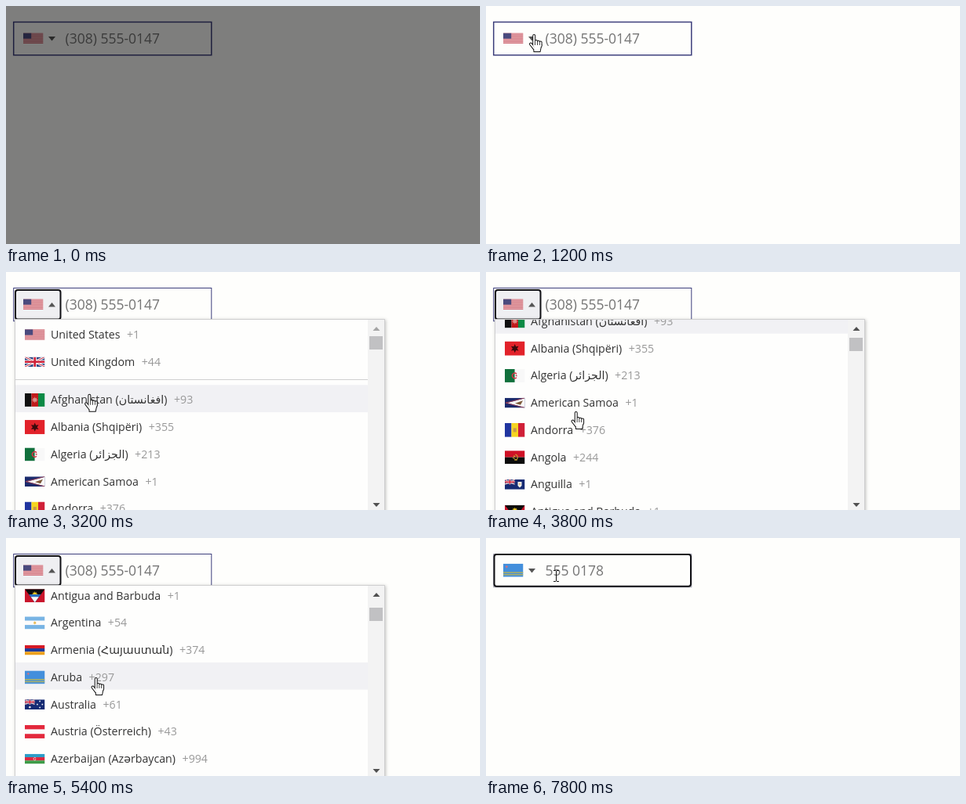
Animation of 604x304 px, one loop 8000 ms. Source, as an HTML page with a canvas:

```html
<!DOCTYPE html>
<html lang="en">
<head>
<meta charset="utf-8">
<title>Phone input with country list</title>
<style>
html, body { margin: 0; width: 100%; height: 100%; overflow: hidden; background: #fefefc; }
canvas { display: block; }
</style>
</head>
<body>
<canvas id="stage" width="604" height="304"></canvas>
<script>
const ctx = document.getElementById('stage').getContext('2d');
const LOOP = 8000, STEP = 200;
const OPEN = 1600, PICK = 6000;
const ROW = 34.75, LIST_TOP = 61, GROUP_TOP = 144.4;
const LIST_FONT = '14.2px "Open Sans", "DejaVu Sans", sans-serif';
const FIELD_FONT = '17.5px "Open Sans", sans-serif';

// ---- shapes ----
function rect(color, x, y, w, h) {
  ctx.fillStyle = color;
  ctx.fillRect(x, y, w, h);
}
function trace(pts) {
  ctx.beginPath();
  for (let i = 0; i < pts.length; i += 2) ctx.lineTo(pts[i], pts[i + 1]);
}
function poly(color, ...pts) {
  trace(pts);
  ctx.fillStyle = color;
  ctx.fill();
}
function line(color, width, ...pts) {
  trace(pts);
  ctx.strokeStyle = color;
  ctx.lineWidth = width;
  ctx.stroke();
}
function star(color, x, y, r, points = 5) {
  const pts = [];
  for (let i = 0; i < points * 2; i++) {
    const a = i * Math.PI / points - Math.PI / 2, d = i % 2 ? r / 2 : r;
    pts.push(x + d * Math.cos(a), y + d * Math.sin(a));
  }
  poly(color, ...pts);
}
function arc(color, width, x, y, r, from, to) {
  ctx.beginPath();
  ctx.arc(x, y, r, from, to);
  ctx.strokeStyle = color;
  ctx.lineWidth = width;
  ctx.stroke();
}
function crescent(color, x, y, r) {
  arc(color, r * 0.45, x, y, r, 0.8, 5.5);
  star(color, x + r * 0.6, y, r * 0.45);
}
function focusBox(x, y, w, h, fill) {
  ctx.beginPath();
  ctx.roundRect(x, y, w, h, 3);
  ctx.fillStyle = fill;
  ctx.fill();
  ctx.strokeStyle = '#101014';
  ctx.lineWidth = 2;
  ctx.stroke();
}
function caret(color, x, y, size) {
  poly(color, x - 4.5, y - size / 2, x + 4.5, y - size / 2, x, y + size / 2);
}
function text(str, x, y, color, font = LIST_FONT) {
  ctx.font = font;
  ctx.fillStyle = color;
  ctx.fillText(str, x, y);
  return x + ctx.measureText(str).width;
}

// ---- flags: [height / width, painter], drawn from the top left corner ----
const FW = 25.5, MID = FW / 2;

function rows(h, ...colors) {
  const s = h / colors.length;
  colors.forEach((c, i) => rect(c, 0, i * s, FW, s));
}
function cols(h, ...colors) {
  const s = FW / colors.length;
  colors.forEach((c, i) => rect(c, i * s, 0, s, h));
}
function jack(w, h) {
  const k = w / FW;
  ctx.save();
  ctx.beginPath();
  ctx.rect(0, 0, w, h);
  ctx.clip();
  rect('#27407f', 0, 0, w, h);
  for (const [color, width] of [['#f4f4f6', 3], ['#cf3045', 1]]) {
    line(color, width * k, 0, 0, w, h);
    line(color, width * k, w, 0, 0, h);
  }
  for (const [color, width] of [['#f4f4f6', 4.6], ['#cf2038', 2.7]]) {
    line(color, width * k, w / 2, 0, w / 2, h);
    line(color, width * k, 0, h / 2, w, h / 2);
  }
  ctx.restore();
}
function ensign(h) {
  rect('#152a73', 0, 0, FW, h);
  jack(MID, h / 2);
}

const flags = {
  us: [0.53, h => {
    rect('#e8b6bb', 0, 0, FW, h);
    for (let i = 0; i < 13; i += 2) rect('#d06c77', 0, i * h / 13, FW, h / 13);
    rect('#4a4a7e', 0, 0, FW * 0.4, h * 7 / 13);
  }],
  gb: [1 / 2, h => jack(FW, h)],
  af: [2 / 3, h => {
    cols(h, '#101010', '#c01a1a', '#0b8a45');
    star('#dd8f8a', MID, h / 2, 4.2, 8);
  }],
  al: [5 / 7, h => {
    rect('#e2222a', 0, 0, FW, h);
    star('#3a0a0c', MID, h / 2, 5.6, 6);
  }],
  dz: [2 / 3, h => {
    cols(h, '#11703c', '#f8f8f8');
    crescent('#d43545', MID, h / 2, 3.2);
  }],
  as: [1 / 2, h => {
    rect('#1a2a6c', 0, 0, FW, h);
    poly('#f8f8f8', FW, 0.5, 3, h / 2, FW, h - 0.5);
    line('#b04050', 0.8, FW, 0, 1, h / 2, FW, h);
    poly('#7d5a3a', 13, 7, 23, 3.5, 20, 9);
  }],
  ad: [0.7, h => {
    cols(h, '#2035a0', '#f6d520', '#d02038');
    rect('#c99a4a', MID - 2, h / 2 - 2.5, 4, 5);
  }],
  ao: [2 / 3, h => {
    rows(h, '#cf1126', '#0c0c0c');
    arc('#c9a030', 1.1, MID, h / 2, 3.6, -1.4, 1.7);
    line('#c9a030', 1.1, 10, 9, 15.5, 12.5);
    star('#c9a030', 12, 7.3, 1.6);
  }],
  ai: [1 / 2, h => {
    ensign(h);
    poly('#f0f0ea', 16.5, 3, 21.5, 3, 21.5, 8, 19, 10.5, 16.5, 8);
    star('#e0a050', 19, 5.8, 1.6, 3);
  }],
  ag: [2 / 3, h => {
    rect('#c9152b', 0, 0, FW, h);
    poly('#0c0c0c', 0, 0, FW, 0, MID, h);
    star('#f2cc22', MID, h * 0.4, 4, 9);
    poly('#2a6fc0', 5.1, h * 0.4, FW - 5.1, h * 0.4, MID, h);
    poly('#fafafa', 7.7, h * 0.6, FW - 7.7, h * 0.6, MID, h);
  }],
  ar: [0.63, h => {
    rows(h, '#78b4e4', '#fbfbfb', '#78b4e4');
    star('#e5ba55', MID, h / 2, 2.3, 8);
  }],
  am: [1 / 2, h => rows(h, '#d51a26', '#1c3c9c', '#eca01c')],
  aw: [2 / 3, h => {
    rect('#438fdc', 0, 0, FW, h);
    for (const y of [0.63, 0.79]) rect('#b5b35c', 0, h * y, FW, h / 12);
    star('#d8707c', 4.3, 4, 2, 4);
  }],
  au: [1 / 2, h => {
    ensign(h);
    star('#f4f4f8', FW / 4, h * 0.77, 1.8, 7);
    for (let a = 0; a < 4; a++)
      star('#f4f4f8', FW * 0.75 + 3.2 * Math.cos(a * Math.PI / 2), h / 2 + 4 * Math.sin(a * Math.PI / 2), 1.3, 7);
  }],
  at: [2 / 3, h => rows(h, '#e3283c', '#fbfbfb', '#e3283c')],
  az: [1 / 2, h => {
    rows(h, '#2c9dc8', '#dc2840', '#3e9c48');
    crescent('#f6e4e6', MID, h / 2, 1.7);
  }]
};
function drawFlag(key, x, midY) {
  const [ratio, paint] = flags[key], h = FW * ratio;
  ctx.save();
  ctx.translate(x, midY - h / 2);
  ctx.beginPath();
  ctx.rect(0, 0, FW, h);
  ctx.clip();
  paint(h);
  ctx.restore();
}

const countries = [
  ['us', 'United States', '+1'],
  ['gb', 'United Kingdom', '+44'],
  ['af', 'Afghanistan (افغانستان)', '+93'],
  ['al', 'Albania (Shqipëri)', '+355'],
  ['dz', 'Algeria (الجزائر)', '+213'],
  ['as', 'American Samoa', '+1'],
  ['ad', 'Andorra', '+376'],
  ['ao', 'Angola', '+244'],
  ['ai', 'Anguilla', '+1'],
  ['ag', 'Antigua and Barbuda', '+1'],
  ['ar', 'Argentina', '+54'],
  ['am', 'Armenia (Հայաստան)', '+374'],
  ['aw', 'Aruba', '+297'],
  ['au', 'Australia', '+61'],
  ['at', 'Austria (Österreich)', '+43'],
  ['az', 'Azerbaijan (Azərbaycan)', '+994']
];
const rowTop = i => i < 2 ? LIST_TOP + i * ROW : GROUP_TOP + (i - 2) * ROW;

// ---- motion ----
function ease(t, start, span) {
  const p = Math.min(1, Math.max(0, (t - start) / span));
  return p * p * (3 - 2 * p);
}

// Three turns of the mouse wheel, one after the other.
const NOTCH = 111;
function scrollAt(t) {
  let y = 0;
  for (let i = 0; i < 3; i++) y += NOTCH * ease(t, 3476 + i * 395, 400);
  return y;
}

// The pointer glides to the flag button, to a row, then to the number.
const glides = [{ at: 400, x: 61, y: 36 }, { at: 2600, x: 114.5, y: 178 }, { at: 7000, x: 89, y: 48 }];
function pointerAt(t) {
  let x = 300, y = 230;
  for (const g of glides) {
    const p = ease(t, g.at, 800);
    x += (g.x - x) * p;
    y += (g.y - y) * p;
  }
  return { x, y };
}

// Hover is only refreshed once the wheel has come to rest.
function hoveredRow(t) {
  const y = pointerAt(t).y + (t < 5000 ? 0 : scrollAt(t));
  return Math.max(0, countries.findLastIndex((c, i) => rowTop(i) <= y));
}

// ---- parts ----
function drawRow([flag, name, code], top, active) {
  if (active) rect('#f1f1f4', 12, top, 449, ROW);
  drawFlag(flag, 24, top + 19);
  const base = Math.round(top + 24);
  const end = text(name, 57, base, '#333');
  text(code, end + 8.5, base, '#999');
}
function drawMenu(t) {
  const scroll = scrollAt(t), active = hoveredRow(t);
  ctx.save();
  ctx.shadowColor = 'rgba(0,0,0,.25)';
  ctx.shadowBlur = 4;
  ctx.shadowOffsetX = ctx.shadowOffsetY = 1;
  rect('#cfcfd0', 11, 60, 472, 260);
  ctx.restore();
  rect('#fefefd', 12, LIST_TOP, 470, 260);

  ctx.save();
  ctx.beginPath();
  ctx.rect(12, LIST_TOP, 449, 243);
  ctx.clip();
  rect('#d0d0d0', 12, Math.round(137 - scroll), 449, 1);
  countries.forEach((c, i) => drawRow(c, rowTop(i) - scroll, i === active));
  ctx.restore();

  rect('#f3f3f3', 461, LIST_TOP, 21, 243);
  rect('#c1c1c3', 463, Math.round(82 + scroll * 0.021), 17, 17);
  caret(scroll ? '#505050' : '#a5a5a5', 472, 72.5, -5);
  caret('#505050', 472, 297.5, 5);
}
function drawField(t) {
  const done = t >= PICK, open = t >= OPEN && !done;
  ctx.strokeStyle = done ? '#a0a0b0' : '#3d3f7c';
  ctx.lineWidth = open || done ? 1 : 1.5;
  ctx.strokeRect(9.7, 20.5, 252.1, 42.2);
  if (done) focusBox(10.5, 21, 250.5, 40.7, '#fefefc');
  else if (open) focusBox(12, 23, 57.5, 37.5, '#efeff2');
  else if (t >= 1400) rect('#efeff2', 11, 22, 59, 40);

  drawFlag(done ? 'aw' : 'us', 22, 41.2);
  caret('#555', 58.5, 41.8, open ? -5.5 : 5.5);
  text(done ? '555 0178' : '(308) 555-0147', 75.5, 48, '#757575', FIELD_FONT);
  if (t >= 6200 && (t - 6200) % 1000 < 500) rect('#222', 76, 30, 1, 24);
}

// A wide dark pass under a narrow white one leaves outlined fingers.
function hand() {
  ctx.translate(-6.4, 0);
  ctx.lineCap = 'round';
  for (const [color, width] of [['#111', 4], ['#fff', 2]]) {
    for (let i = 0; i < 4; i++) {
      const x = 6.6 + i * 2.8;
      line(color, width, x, i ? 8.4 + i * 0.7 : 2, x, 15);
    }
    line(color, width, 2.4, 12.6, 7, 18.5);
    line(color, width, 7.5, 15, 14.5, 15, 13.2, 21, 7.8, 21, 7.5, 15);
    rect(color, 7.5, 14.5, 6, 6.5);
  }
}
function arrow() {
  ctx.lineJoin = 'round';
  const shape = [0, 0, 0, 16, 3.7, 12.6, 6.2, 18.4, 8.6, 17.4, 6.2, 11.6, 11.3, 11.6, 0, 0];
  poly('#fff', ...shape);
  line('#111', 1.2, ...shape);
}
function beam() {
  rect('#111', 0, -6, 1, 13);
  for (const y of [-7, 7])
    for (const x of [-3, 1]) rect('#111', x, y, 3, 1);
}
function drawPointer(t) {
  if (t < 400) return;
  const { x, y } = pointerAt(t);
  ctx.save();
  ctx.translate(x, y);
  if (t >= PICK && y < 62) beam();
  else if (t >= 1200 && t < PICK) hand();
  else arrow();
  ctx.restore();
}

function draw(t) {
  rect('#fefefc', 0, 0, 604, 304);
  drawField(t);
  if (t >= OPEN && t < PICK) drawMenu(t);
  drawPointer(t);
  if (t < 200) rect('rgba(0,0,0,.5)', 0, 0, 604, 304);
}

// The picture advances five times a second.
const start = performance.now();
function tick() {
  const t = (performance.now() - start) % LOOP;
  draw(Math.floor(t / STEP) * STEP);
  requestAnimationFrame(tick);
}
tick();
</script>
</body>
</html>
```
